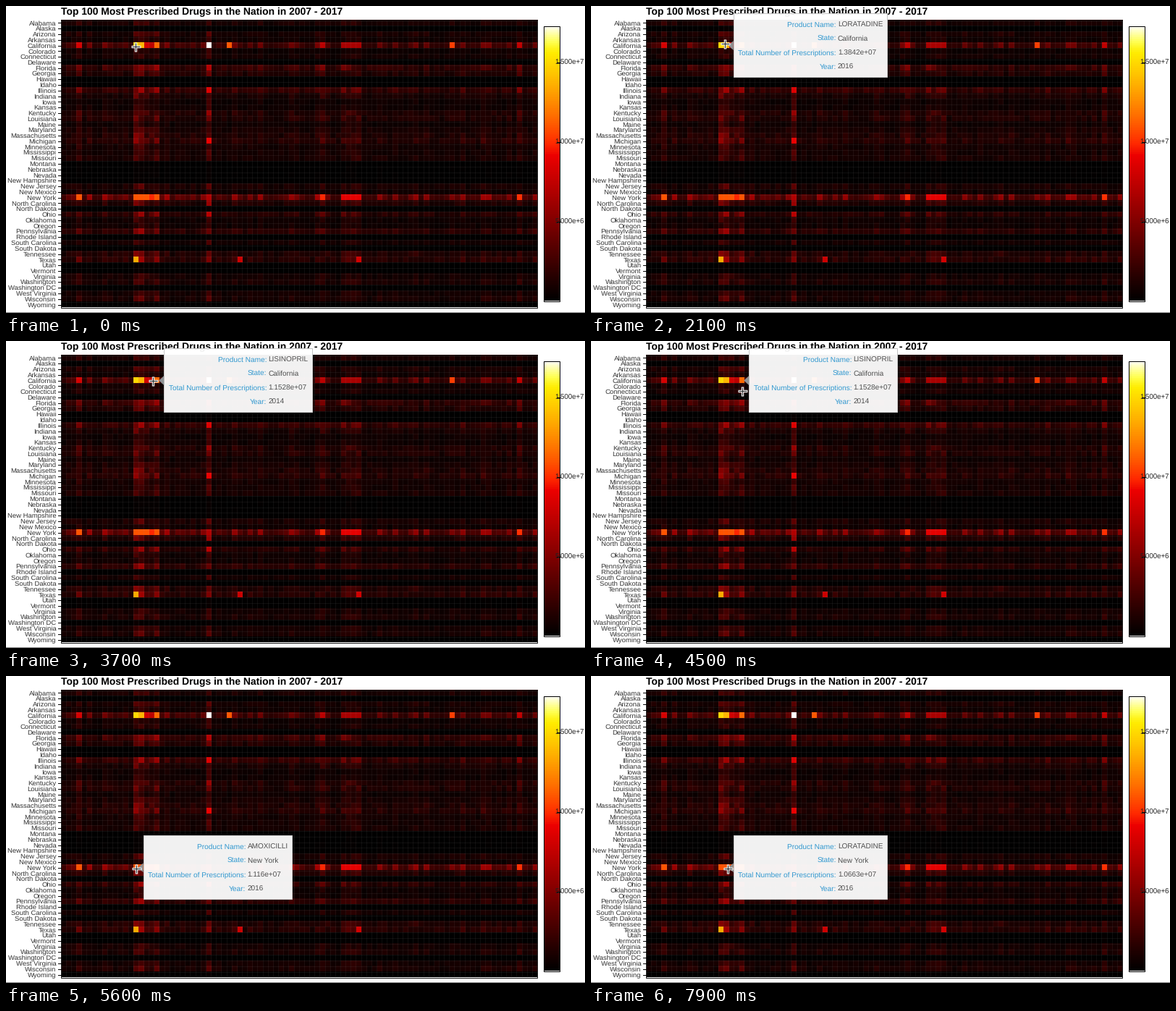
Animation of 800x424 px, one loop 8000 ms. Source, as a matplotlib script:

```python
import numpy as np
import matplotlib.pyplot as plt
from matplotlib.animation import FuncAnimation
from matplotlib.colors import ListedColormap
from matplotlib.patches import Polygon, Rectangle

W, H, DPI = 800, 424, 100
FRAMES, INTERVAL = 80, 100
LEFT, RIGHT, TOP, BOTTOM = 75.5, 734, 19.5, 416.5
COLS = 92

STATES = """Alabama,Alaska,Arizona,Arkansas,California,Colorado,Connecticut,Delaware,
Florida,Georgia,Hawaii,Idaho,Illinois,Indiana,Iowa,Kansas,Kentucky,Louisiana,Maine,
Maryland,Massachusetts,Michigan,Minnesota,Mississippi,Missouri,Montana,Nebraska,Nevada,
New Hampshire,New Jersey,New Mexico,New York,North Carolina,North Dakota,Ohio,Oklahoma,
Oregon,Pennsylvania,Rhode Island,South Carolina,South Dakota,Tennessee,Texas,Utah,Vermont,
Virginia,Washington,Washington DC,West Virginia,Wisconsin,Wyoming""".replace("\n", "").split(",")
ROWS = len(STATES)
CELL_W, CELL_H = (RIGHT - LEFT) / COLS, (BOTTOM - TOP) / ROWS

# States by volume, largest tier first
TIERS = [
    "Florida,Illinois",
    "Texas,Michigan,Ohio,Pennsylvania",
    "Georgia,Kentucky,North Carolina,Louisiana,Tennessee,Massachusetts",
    "Missouri,New Jersey,Wisconsin,Indiana,Washington,Arizona,Alabama,Maryland",
    "Virginia,Mississippi,South Carolina,Minnesota,Connecticut,West Virginia",
    "Iowa,Oklahoma,Arkansas,Maine,Oregon,Colorado,New Mexico,Kansas",
]
# Best-selling products by column, and single hot cells
TOP_SELLERS = {3: .48, 14: .867, 15: .8, 16: .468, 17: .42, 18: .667, 28: 1, 50: .42, 88: .43}
HOT_CELLS = [("California", 32, .64), ("California", 75, .6), ("Texas", 14, .78),
             ("Texas", 34, .46), ("Texas", 57, .47), ("Michigan", 28, .53), ("New York", 28, .4)]

# first frame, product, column, state, total, year
TIPS = [
    (5, "AMOXICILLI", 14, "California", "1.4966e+07", 2016),
    (18, "LORATADINE", 15, "California", "1.3842e+07", 2016),
    (28, "AMLODIPINE", 16, "California", "8.0861e+06", 2010),
    (37, "LISINOPRIL", 18, "California", "1.1528e+07", 2014),
    (48, "AMLODIPINE", 16, "New Hampshire", "57846", 2017),
    (54, "AMOXICILLI", 14, "New York", "1.116e+07", 2016),
    (73, "LORATADINE", 15, "New York", "1.0663e+07", 2016),
]
FIELDS = ["Product Name:", "State:", "Total Number of Prescriptions:", "Year:"]

# frame, x, y of the pointer
PATH = [(0, 179, 56), (14, 178, 51), (28, 192, 53), (42, 208, 56), (45, 209, 69),
        (50, 189, 245), (56, 180, 266), (70, 180, 266), (79, 189, 266)]


def px(n):
    return n * 72 / DPI


def row_y(state):
    return TOP + (STATES.index(state) + .5) * CELL_H


def fire_map():
    t = np.linspace(0, 1, 256)

    def ramp(a, b):
        return np.clip((t - a) / (b - a), 0, 1)

    return ListedColormap(np.c_[ramp(0, .57), ramp(.53, .94) ** .8, ramp(.9, 1) ** 1.3])


def make_data():
    rng = np.random.default_rng(11)
    cols = .09 + .18 * rng.random(COLS) ** 1.5
    cols[54:58] = .38
    for c, v in TOP_SELLERS.items():
        cols[c] = v
    share = np.full(ROWS, .03)
    for tier, names in enumerate(TIERS):
        for name in names.split(","):
            share[STATES.index(name)] = .6 * .8 ** tier
    data = np.outer(share, .6 * cols + .1) * rng.uniform(.6, 1.3, (ROWS, COLS))
    data[STATES.index("California")] = cols
    data[STATES.index("New York")] = np.minimum(1.35 * cols, .63)
    for name, c, v in HOT_CELLS:
        data[STATES.index(name), c] = v
    return data


plt.rcParams["font.family"] = "Liberation Sans"
plt.rcParams["text.hinting"] = "none"
fig = plt.figure(figsize=(W / DPI, H / DPI), dpi=DPI, facecolor="white")
ax = fig.add_axes([0, 0, 1, 1])
fire = fire_map()


def label(x, y, s, size, color, **kw):
    return ax.text(x, y, s, fontsize=px(size), color=color, va="baseline", **kw)


def outline(x0, y0, x1, y1, color):
    ax.add_patch(Rectangle((x0, y0), x1 - x0, y1 - y0, fill=False, ec=color, lw=px(1)))


# Heat map
ax.imshow(make_data(), cmap=fire, vmin=0, vmax=1, interpolation="nearest",
          extent=(LEFT, RIGHT, BOTTOM, TOP), aspect="auto")
grid = dict(color="#909090", alpha=.1, lw=px(1))
ax.hlines(TOP + CELL_H * np.arange(1, ROWS), LEFT, RIGHT, **grid)
ax.vlines(LEFT + CELL_W * np.arange(1, COLS), TOP, BOTTOM, **grid)
outline(LEFT, TOP, RIGHT, BOTTOM, "#1c1c1c")

label(76, 12.4, "Top 100 Most Prescribed Drugs in the Nation in 2007 - 2017",
      13.87, "black", weight="bold")
for name in STATES:
    y = row_y(name)
    label(69.5, y + 3.1, name, 9.5, "#333333", ha="right")
    ax.plot([71.5, 76], [y, y], color="black", lw=px(1))

# Colour bar
ax.imshow(np.linspace(1, 0, 256)[:, None], cmap=fire, interpolation="nearest",
          extent=(743, 764.5, 407.5, 28), aspect="auto")
outline(743, 28, 764.5, 407.5, "black")
for i in range(3):
    y = 78 + 110 * i
    ax.plot([760.5, 765.5], [y, y], color="black", lw=px(1))
    value = f"{15 - 5 * i}e6"
    label(799, y + 3.3, f"{float(value):.3e}".replace("+0", "+"), 9.6, "#222222", ha="right")

ax.plot([0, W], [422.5, 422.5], color="#777777", lw=px(1))
ax.set(xlim=(0, W), ylim=(H, 0))
ax.axis("off")

# Tooltip
box = ax.add_patch(Rectangle((0, 0), 1, 87.5, fc=(1, 1, 1, .95), ec="#c4c4c4", lw=px(1), zorder=10))
arrow = ax.add_patch(Polygon([(0, 0), (1, 1), (1, 0)], fc="#8f9294", ec="none", zorder=11))
keys = [label(0, 0, s, 10.1, "#3399d0", ha="right", zorder=12) for s in FIELDS]
vals = [label(0, 0, "", 10, "#505050", zorder=12) for _ in FIELDS]
tip_parts = [box, arrow, *keys, *vals]

# Crosshair pointer
cross = []
for color, width, reach in (("white", 3.4, 6.5), ("#303030", 1.2, 5.5)):
    for dx, dy in ((reach, 0), (0, reach)):
        line, = ax.plot([], [], color=color, lw=px(width), solid_capstyle="butt", zorder=20)
        cross.append((line, dx, dy))


def show_tip(product, col, state, total, year):
    cy = row_y(state)
    left, top = LEFT + (col + .5) * CELL_W + 10.3, cy - 44.3
    for i, s in enumerate((product, state, total, str(year))):
        y = top + 18.8 + 19.2 * i
        keys[i].set_position((left + 142, y))
        vals[i].set_position((left + 144, y))
        vals[i].set_text(s)
    renderer = fig.canvas.get_renderer()
    width = max(v.get_window_extent(renderer).width for v in vals)
    box.set_xy((left, top))
    box.set_width(144 + width + 5.5)
    arrow.set_xy([(left - 7, cy), (left, cy - 6.5), (left, cy + 6.5)])


def pointer(frame):
    for (f0, *a), (f1, *b) in zip(PATH, PATH[1:]):
        if frame <= f1:
            u = (frame - f0) / (f1 - f0)
            u = u * u * (3 - 2 * u)
            return [p + (q - p) * u for p, q in zip(a, b)]


def update(frame):
    current = [t for t in TIPS if t[0] <= frame]
    for part in tip_parts:
        part.set_visible(bool(current))
    if current:
        show_tip(*current[-1][1:])
    x, y = pointer(frame)
    for line, dx, dy in cross:
        line.set_data([x - dx, x + dx], [y - dy, y + dy])
    return [*tip_parts, *(c[0] for c in cross)]


anim = FuncAnimation(fig, update, frames=FRAMES, interval=INTERVAL,
                     repeat=True, repeat_delay=0, blit=False)
plt.show()
```
